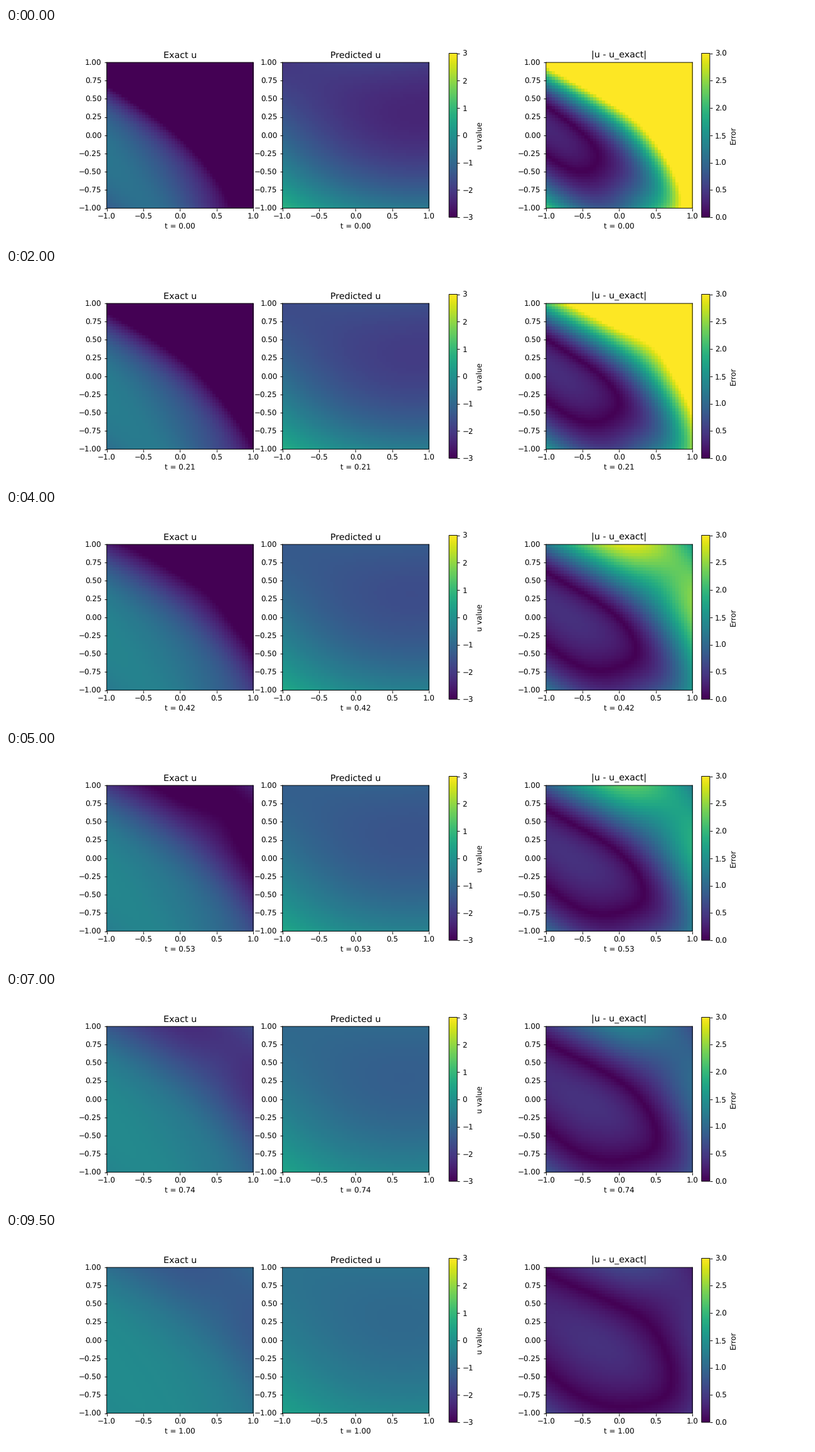
Recreate the animation shown at these times as a matplotlib script. Size 1280 px wide and 341 px high, loop 10000 ms.

```python
import numpy as np
import matplotlib.pyplot as plt
from matplotlib.animation import FuncAnimation

FRAMES, INTERVAL = 20, 500
GRID = 50

# Unsnapped lines and unhinted glyphs keep sub-pixel positions
plt.rcParams.update({"font.family": "DejaVu Sans",
                     "path.snap": False, "text.hinting": "none"})

axis = np.linspace(-1, 1, GRID)
X, Y = np.meshgrid(axis, axis)


def exact_field(x, y):
    """Squared wave running along the diagonal, with curved fronts."""
    along, across = x + y, x - y
    front = along + .08 * (across - .4) ** 2
    wave = 1.93 + 1.14 * np.sin(1.2 * front - .16 + .05 * front**2)
    trough = .16 * (1 + across) * np.exp(-3 * (along + .8) ** 2)
    dip = .18 * np.exp(-4 * ((x - .6) ** 2 + (y - .6) ** 2))
    return -(wave + trough - dip) ** 2


def predicted_field(x, y):
    """Smooth bowl whose section in y changes with x."""
    level = -2.03 - .575 * x + .355 * x**2
    slope = -.775 + .378 * x - .26 * x**2
    curve = .955 + .25 * x - .24 * x**2
    return level + slope * y + curve * y**2


def rest_field(x, y):
    """State that the prediction relaxes towards."""
    return -.14 - .06 * x - .05 * y + .1 * x**2 + .08 * y**2 + .03 * x * y


def fields(t):
    exact = np.exp(-1.9 * t) * exact_field(X, Y)
    fade = np.exp(-t)
    predicted = fade * predicted_field(X, Y) + (1 - fade) * rest_field(X, Y)
    return exact, predicted, np.abs(predicted - exact)


fig, axes = plt.subplots(
    1, 3, figsize=(15, 1023 / 256), dpi=256 / 3,
    gridspec_kw=dict(left=.1254, right=.9004, bottom=.1112, top=.8812))
titles = ("Exact u", "Predicted u", "|u - u_exact|")
limits = ((-3, 3), (-3, 3), (0, 3))
images = []
for ax, title, (low, high), data in zip(axes, titles, limits, fields(0)):
    images.append(ax.imshow(data, extent=(-1, 1, -1, 1), origin="lower",
                            cmap="viridis", vmin=low, vmax=high,
                            interpolation="nearest"))
    ax.set_title(title)

fig.colorbar(images[0], ax=list(axes[:2]), label="u value")
fig.colorbar(images[2], ax=axes[2], label="Error")


def update(frame):
    t = frame / (FRAMES - 1)
    for ax, image, data in zip(axes, images, fields(t)):
        image.set_data(data)
        ax.set_xlabel(f"t = {t:.2f}")
    return images


anim = FuncAnimation(fig, update, frames=FRAMES, interval=INTERVAL,
                     repeat=True, repeat_delay=0, blit=False)
plt.show()
```
